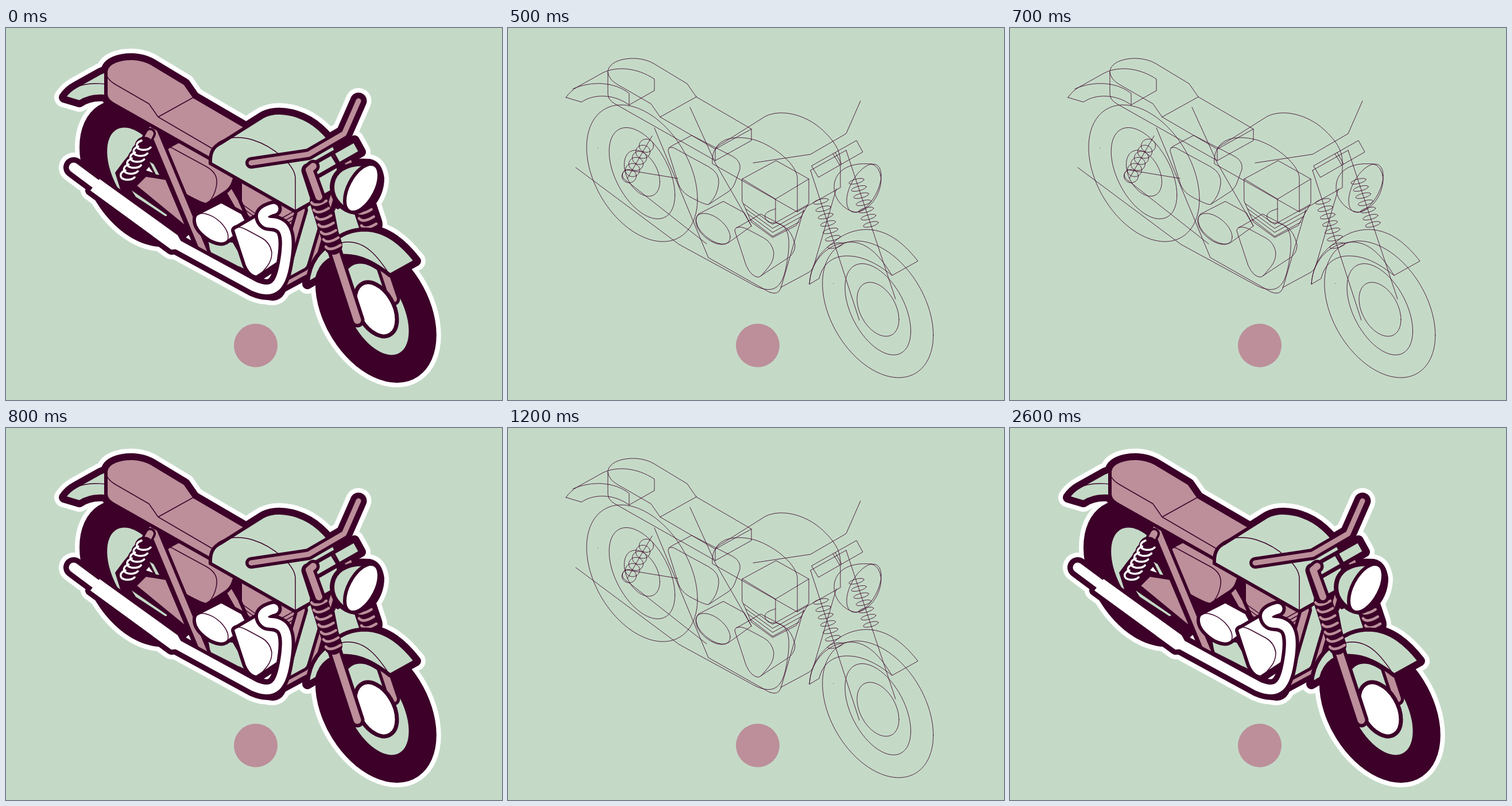
Write an HTML page that moves like this. It is 864 px wide and 648 px high and loops after 3400 ms.

```html
<!DOCTYPE html>
<html lang="en">
<head>
<meta charset="utf-8">
<title>Motorcycle</title>
<style>
html, body { margin: 0; width: 100%; height: 100%; overflow: hidden; background: #c4dac7; }
svg { display: block; width: 100vw; height: 100vh; }
</style>
</head>
<body>
<svg id="stage" viewBox="0 0 864 648" fill="none" stroke-linecap="round" stroke-linejoin="round"></svg>
<script>
const GREEN = '#c4dac7', DARK = '#3c0029', PINK = '#bc8f9a', WHITE = '#fff';
const EDGE = 6, RIM = 18, HALO = 34;

// Slanted ellipse: half extents w, h; lean is the y shift at its rightmost point.
function oval(cx, cy, w, h, lean) {
  const v = Math.sqrt(h * h - lean * lean), k = 0.5523;
  const p = (a, b) => `${(cx + a * w).toFixed(1)},${(cy + a * lean + b * v).toFixed(1)} `;
  let d = 'M' + p(1, 0), a = 1, b = 0;
  for (let i = 0; i < 4; i++) {
    const [c, e] = [-b, a];
    d += 'C' + p(a + k * c, b + k * e) + p(c + k * a, e + k * b) + p(c, e);
    [a, b] = [c, e];
  }
  return d + 'Z';
}

// Evenly spaced copies of a drawing along a straight line.
function along(n, x0, y0, x1, y1, draw) {
  return Array.from({ length: n }, (_, i) => {
    const u = i / (n - 1);
    return draw(x0 + (x1 - x0) * u, y0 + (y1 - y0) * u);
  });
}

const wheel = (x, y) => ({
  tyre: oval(x, y, 96.5, 119, 45),
  rim: oval(x, y, 57.3, 79.5, 38),
});
const rear = wheel(233.5, 253), front = wheel(644.3, 490);
const rearHub = oval(233.5, 253, 31, 40, 15);
const frontHub = oval(644.5, 490, 36.5, 47, 18);

const tail = 'M101,121L128,129C150,114 185,115 211,134L255,109V89C225,69 190,66 165,78L122,102Q109,109 101,121Z';
const tailCrease = 'M113,106C145,92 185,93 211,114V134';
const seat = 'M174,75C176,60 198,52 222,53Q240,54 254,62L312,97L328,120L424,176V196L361,231L186,132Q174,125 174,115Z';
const seatCrease = 'M174,77Q175,89 190,98L249,132L265,155L361,211M265,155L328,120';
const seatBack = 'M361,231V211L424,176';
const tank = 'M356,236C355,215 362,206 375,200L448,154C476,140 518,151 546,176C570,198 579,214 579,235V278L504,320Z';
const tankCrease = 'M361,211C372,188 405,188 430,195C468,207 504,240 504,262V320';
const cover = 'M279,214Q279,209 284,206L320,187L392,224Q406,232 404,246L396,268Q393,278 384,285L350,307Q346,310 315,293Q301,284 297,272Z';
const coverCrease = 'M280,209Q286,206 293,211L350,242Q369,253 367,271Q365,292 350,307';
const block = 'M408,263L467,231L524,263V305L502,344L461,365L424,338L408,302Z';
const blockCrease = 'M408,263L466,298L524,263M466,298V338';
const fins = [0, 1, 2, 3].map(i => `M${410 + i * 4},${306 + i * 9}L461,${342 + i * 7}L${522 - i * 5},${308 + i * 10}`).join('');
const drum = 'M332,324L375,302L412,322L424,345L384,374Q374,380 356,371Q330,355 328,337Q327,328 332,324Z';
const drumFace = oval(357, 350, 30, 27, 14);
const crank = 'M395,353Q395,348 402,346L440,324L480,345Q495,354 500,378Q500,391 490,399L437,434Q424,434 415,414Z';
const crankCrease = 'M398,348Q405,344 420,352L446,366Q460,374 463,391Q463,405 455,415L441,432';
const swing = 'M224,275L243,256L280,262L318,352Z';
const frame = 'M255,174L349,400L455,460Q470,466 475,454L515,317';
const strut = 'M317,138L361,235L424,345';
const downTube = 'M475,452L525,425Q531,421 533,413L572,280';
const pipe = 'M466,315C452,319 444,324 449,333C456,345 465,334 479,345C491,354 490,378 488,394C482,440 473,468 432,450L298,377L118,243';
const muffler = 'M163,263L299,361L305,372L300,385L288,386L147,283Z';
const bars = 'M427,235L527,220L589,184L614,127';
const clamp = 'M529,240L607,196L618,216L541,260Z';
const clampLines = 'M566,219L578,239M570,217L581,237';
const lamp = 'M633,237C592,233 568,250 568,278C568,300 588,319 607,321C630,318 650,290 650,262Q647,240 633,237Z';
const lens = oval(620, 279, 30, 42, -22);
const leftFork = 'M527,248L612,509', rightFork = 'M589,213L675,472';
const guard = 'M525,446C528,405 550,385 569,372C586,357 606,351 626,351C664,352 692,378 714,406L669,431C645,412 620,397 590,397C570,397 549,407 542,436Z';
const guardCrease = 'M525,446C528,400 560,378 585,374C625,366 650,401 669,431';
const shock = 'M251,188L208,262';
const leftSpring = 'M545,302L570,379', rightSpring = 'M607,267L632,342';

const coil = (x, y) => oval(x, y, 13, 5, -3);
const coilFront = (x, y) => `M${x - 13},${y}q7,9 26,-3`;
const leftCoils = along(7, 545, 302, 570, 379, coil);
const rightCoils = along(7, 607, 267, 632, 342, coil);
const leftFronts = along(7, 545, 304, 570, 381, coilFront);
const rightFronts = along(7, 607, 269, 632, 344, coilFront);
const rearCoils = along(6, 241, 205, 211, 258, (x, y) => oval(x, y, 12.5, 11.5, 0));
const rearHooks = along(6, 240, 205, 212, 257, (x, y) =>
  `M${x - 4},${y - 9}c-11,4 -11,14 0,16c7,1 12,0 16,-4`);

const fill = (d, color) => `<path d="${d}" fill="${color}"/>`;
const line = (d, color, width) => `<path d="${d}" stroke="${color}" stroke-width="${width}"/>`;
const part = (d, color, edge = EDGE) =>
  `<path d="${d}" fill="${color}" stroke="${DARK}" stroke-width="${edge}"/>`;
const thin = d => line(d, DARK, 1.5);
const tube = (d, color, width, edge = 11) => line(d, DARK, width + edge) + line(d, color, width);

const bodies = [rear.tyre, front.tyre, tail, seat, tank, cover, block, drum, crank, swing, muffler, clamp, lamp, guard];
const rods = [[frame, 8], [downTube, 6], [pipe, 18], [bars, 11], [leftFork, 12],
  [leftSpring, 26], [rightSpring, 30]];

function silhouette(color, extra) {
  return bodies.map(d => `<path d="${d}" fill="${color}" stroke="${color}" stroke-width="${extra}"/>`).join('') +
    rods.map(([d, w]) => line(d, color, w + extra)).join('');
}

function painted() {
  return [
    silhouette(WHITE, HALO), silhouette(DARK, RIM),
    fill('M300,285L400,280L424,345L400,372L340,372Z', DARK),
    fill('M352,368L395,374L424,424L356,390Z', GREEN),
    fill('M518,322L533,303L549,380L527,423L494,440Z', GREEN),
    fill('M572,318L588,312L610,322L617,348L590,358L580,360Z', GREEN),

    part(tail, GREEN), thin(tailCrease),
    fill(rear.tyre, DARK), fill(rear.rim, GREEN),
    fill('M248,180L205,232L190,252L205,300L265,345L305,340L290,175Z', DARK),
    fill('M250,233L257,237L267,256L261,255Z', GREEN),
    fill('M244,248L249,242L256,252Z', WHITE),
    part(swing, PINK), fill('M219,283L281,326L278,328L226,294Z', GREEN),

    tube(strut, PINK, 10), tube(downTube, PINK, 6),
    part(block, PINK), thin(blockCrease), thin(fins),
    part(cover, PINK), thin(coverCrease),
    tube(frame, PINK, 11),
    line('M240,207L211,258', DARK, 30), tube('M251,184L241,203', PINK, 12, 8),
    ...rearCoils.map(d => part(d, DARK, 8)),
    ...rearHooks.map(d => line(d, WHITE, 3.5)),
    part(seat, PINK), thin(seatCrease),
    part(tank, GREEN), thin(tankCrease),
    part(drum, WHITE), thin(drumFace),
    part(crank, WHITE), thin(crankCrease),
    part(muffler, WHITE, 13), line(pipe, DARK, 29), line(pipe, WHITE, 17), fill(muffler, WHITE),

    fill(front.tyre, DARK), fill(front.rim, GREEN),
    tube(rightFork, PINK, 12), part(frontHub, WHITE, 7),
    line(rightSpring, DARK, 36), ...rightFronts.map(d => line(d, PINK, 4.5)),
    part(guard, GREEN, 7), thin(guardCrease),
    part(clamp, GREEN, 7), line(clampLines, DARK, 4),
    part(lamp, GREEN, 8), part(lens, WHITE, 6),
    tube(leftFork, PINK, 13, 12),
    line(leftSpring, DARK, 32), ...leftFronts.map(d => line(d, PINK, 4.5)),
    tube('M535,241L528,247L545,294', PINK, 12),
    tube(bars, PINK, 9),
  ].join('');
}

function wired() {
  const lines = [
    rear.tyre, rear.rim, rearHub, front.tyre, front.rim, frontHub,
    tail, tailCrease, seat, seatCrease, seatBack, tank, tankCrease, cover, coverCrease,
    block, blockCrease, fins, drum, drumFace, crank, crankCrease,
    frame, strut, downTube, pipe, bars, clamp, clampLines, lamp, lens,
    leftFork, rightFork, guard, guardCrease, shock,
    'M296,262L205,247Q196,253 201,262L346,376', 'M527,248L589,213',
    'M157,209h.2M567,445h.2',
    ...leftCoils, ...rightCoils, ...rearCoils,
  ];
  return lines.map(d => line(d, DARK, 0.85)).join('');
}

const stage = document.getElementById('stage');
stage.innerHTML = `<g id="solid">${painted()}</g><g id="wire">${wired()}</g>
  <circle cx="435" cy="553" r="38" fill="${PINK}"/>`;
const solid = document.getElementById('solid'), wire = document.getElementById('wire');

const LOOP = 3400;
const start = performance.now();

function update(t) {
  const bare = (t >= 500 && t < 600) || (t >= 700 && t < 800) || (t >= 900 && t < 1400);
  solid.style.display = bare ? 'none' : '';
  wire.style.display = bare ? '' : 'none';
}

function tick() {
  update((performance.now() - start) % LOOP);
  requestAnimationFrame(tick);
}
tick();
</script>
</body>
</html>
```
